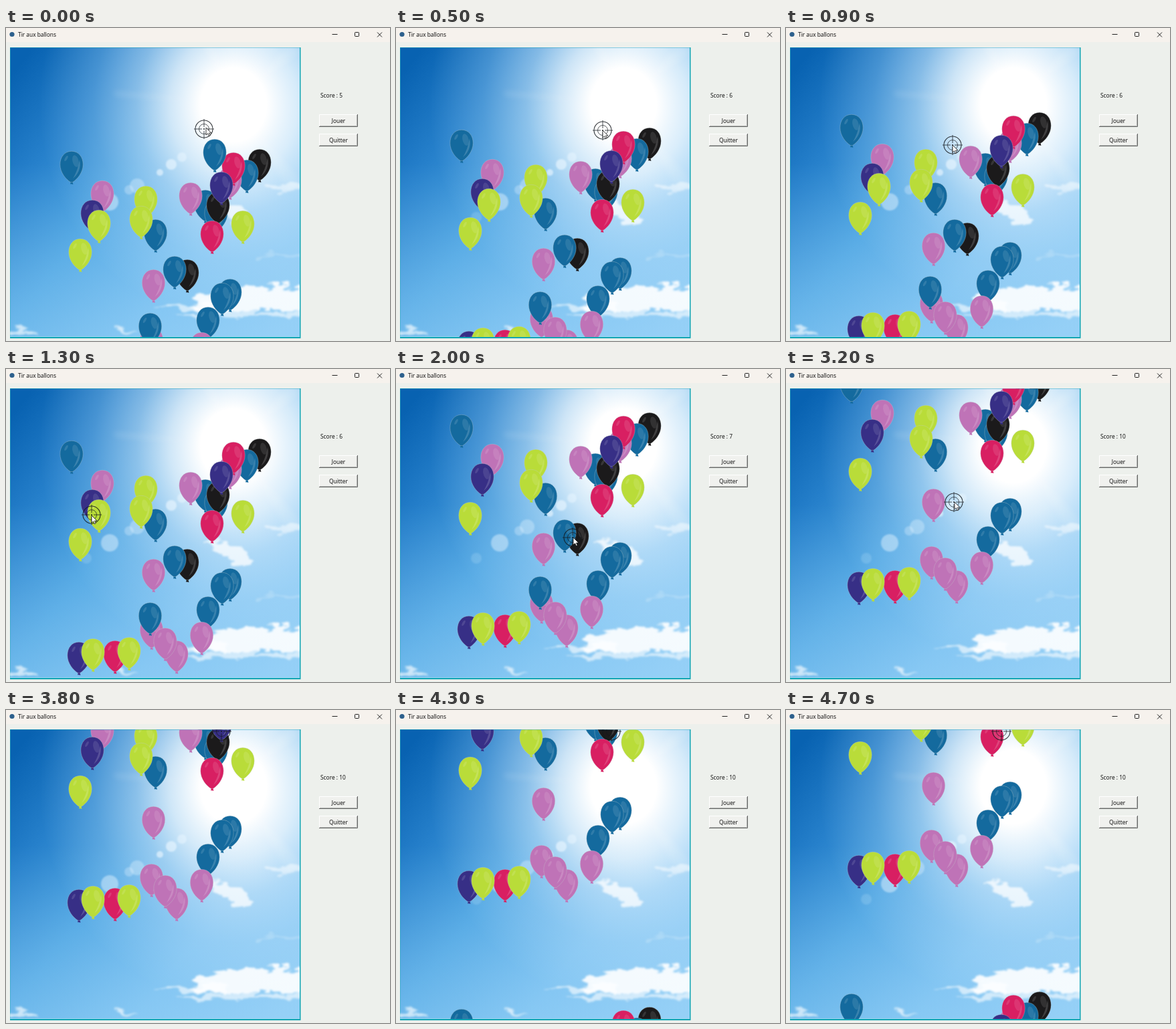
An HTML page that plays this animation: 574 by 468 pixels, repeating every 4800 ms.

```html
<!DOCTYPE html>
<html lang="fr">
<head>
<meta charset="utf-8">
<title>Tir aux ballons</title>
<style>
  html, body { margin: 0; width: 100%; height: 100%; overflow: hidden; background: #edf0ec; }
  svg { display: block; }
  text { font-family: "Open Sans", "Noto Sans", sans-serif; font-size: 8.4px; fill: #050505; }
</style>
</head>
<body>
<svg id="stage" width="574" height="468" viewBox="0 0 574 468">
  <defs>
    <linearGradient id="sky" x1="0" y1=".1" x2="1" y2=".9">
      <stop offset="0" stop-color="#0862b1"/>
      <stop offset=".2" stop-color="#2680cb"/>
      <stop offset=".42" stop-color="#4aa2e1"/>
      <stop offset=".7" stop-color="#76bdef"/>
      <stop offset="1" stop-color="#8ecaf4"/>
    </linearGradient>
    <radialGradient id="glow" gradientUnits="userSpaceOnUse" cx="0" cy="0" r="1"
      gradientTransform="translate(340 115) scale(290 325)">
      <stop offset="0" stop-color="#fff"/>
      <stop offset=".17" stop-color="#fff"/>
      <stop offset=".33" stop-color="#f8fcff" stop-opacity=".77"/>
      <stop offset=".5" stop-color="#e8f5ff" stop-opacity=".46"/>
      <stop offset=".72" stop-color="#d8efff" stop-opacity=".2"/>
      <stop offset="1" stop-color="#d5eeff" stop-opacity="0"/>
    </radialGradient>
    <linearGradient id="haze" x1="0" y1="0" x2="0" y2="1">
      <stop offset=".4" stop-color="#9fd8fa" stop-opacity="0"/>
      <stop offset="1" stop-color="#9fd8fa" stop-opacity=".42"/>
    </linearGradient>
    <filter id="wisp" filterUnits="userSpaceOnUse" x="0" y="220" width="460" height="250"
      color-interpolation-filters="sRGB">
      <feTurbulence type="fractalNoise" baseFrequency=".03 .07" numOctaves="4" seed="6"/>
      <feDisplacementMap in="SourceGraphic" scale="26" xChannelSelector="R" yChannelSelector="G"/>
      <feGaussianBlur stdDeviation="1.6"/>
    </filter>
    <filter id="soft" x="-20%" y="-20%" width="140%" height="140%"><feGaussianBlur stdDeviation="4"/></filter>
    <filter id="lens"><feGaussianBlur stdDeviation="1"/></filter>
    <clipPath id="field"><rect x="6.5" y="29.5" width="432.5" height="432.5"/></clipPath>
    <g id="balloon">
      <path d="M-1.3 45L-1.8 49.6Q0 48.8 2.4 50L1.3 45Z"/>
      <path d="M0 .3C10.5 .3 17.2 8.8 17.2 20C17.2 32 8.5 42.5 1.5 46.5H-1.5C-8.5 42.5-17.2 32-17.2 20C-17.2 8.8-10.5 .3 0 .3Z"
        stroke="#c3cbcc" stroke-opacity=".45" stroke-width=".7"/>
      <path d="M12 13C15 25 9 36 2 41C7 33 10 24 12 13Z" fill="#fff" opacity=".16"/>
      <ellipse cx="6" cy="15" rx="4.5" ry="9" transform="rotate(-14 6 15)" fill="#fff" opacity=".1"/>
      <ellipse cx="-8" cy="11" rx="1.8" ry="4.5" transform="rotate(28 -8 11)" fill="#fff" opacity=".12"/>
    </g>
  </defs>

  <rect width="574" height="468" fill="#edf0ec"/>
  <rect width="574" height="21" fill="#f6f2ed"/>
  <circle cx="9" cy="9.5" r="3.6" fill="#2d608c"/>
  <text x="18" y="12.7">Tir aux ballons</text>
  <g fill="none" stroke="#222">
    <path d="M487.5 9.5h8M555 6.5l7 7m0-7l-7 7"/>
    <rect x="521.5" y="6.5" width="6" height="6" rx=".8"/>
  </g>

  <rect x="6" y="29" width="434.5" height="435" fill="#12a5b4"/>
  <g clip-path="url(#field)">
    <rect x="6" y="29" width="433" height="433" fill="url(#sky)"/>
    <rect x="6" y="29" width="433" height="433" fill="url(#haze)"/>
    <rect x="6" y="29" width="433" height="433" fill="url(#glow)"/>
    <g fill="#fff" opacity=".13" filter="url(#soft)">
      <path d="M340 112L160 94L164 102ZM340 112L292 22H310ZM340 112L425 22L440 36ZM340 112L445 232L425 246Z"/>
    </g>
    <g fill="#e9f6ff" filter="url(#lens)">
      <circle cx="155" cy="260" r="13" opacity=".45"/>
      <circle cx="120" cy="283" r="8" opacity=".16"/>
      <circle cx="184" cy="242" r="7" opacity=".3"/>
      <circle cx="196" cy="236" r="11" opacity=".34"/>
      <circle cx="230" cy="216" r="5" opacity=".65"/>
      <circle cx="247" cy="204" r="8" opacity=".65"/>
      <circle cx="263" cy="193" r="7" opacity=".55"/>
    </g>
    <g fill="#fff" filter="url(#wisp)">
      <path d="M292 400Q330 384 385 385L455 388V426Q400 416 360 420Q310 424 268 417Q282 409 292 400Z" opacity=".9"/>
      <path d="M225 419Q270 413 330 412V418Q270 424 225 419ZM245 432Q300 423 370 420V428Q300 434 245 432ZM310 432Q370 424 445 424V431Q380 435 310 432Z" opacity=".6"/>
      <path d="M300 256Q335 257 353 267Q371 278 366 290Q354 302 342 291Q325 276 300 262Z" opacity=".75"/>
      <path d="M385 237Q420 232 445 236V241Q420 240 385 241Z" opacity=".5"/>
      <path d="M4 451Q22 448 48 457Q22 460 4 457ZM165 449Q182 445 198 451Q182 454 165 452Z" opacity=".65"/>
      <path d="M375 338Q410 332 440 338V342Q405 339 375 343Z" opacity=".2"/>
    </g>
    <path d="M6 461.5H439" stroke="#a9e0ee" opacity=".6"/>
    <g id="balloons"></g>
    <g id="sight" fill="none" stroke="#15191d" opacity=".85">
      <circle r="13" stroke-width="1.1"/>
      <circle r="7.5" stroke-width=".8"/>
      <path d="M-15 0H-3M3 0H15M0-15V-3M0 3V15" stroke-width=".9"/>
      <circle r="1.1" fill="#15191d" stroke="none"/>
    </g>
  </g>

  <text id="score" x="470" y="104"></text>
  <g id="buttons"></g>
  <path id="pointer" d="M0 0V11L2.6 8.7L4.4 12.6L6.2 11.8L4.5 8H8Z" fill="#fff" stroke="#111" stroke-width=".8"/>
</svg>

<script>
// balloons that rise past TOP come back SPAN lower
const LOOP = 4800, STEP = 100, TOP = -8, SPAN = 508;
const COLORS = { b: '#146a9e', p: '#bf73b7', y: '#b9dc39', i: '#372f86', r: '#d81f62', k: '#1b1a1b' };

// x, top at start, colour, time of the hit; back to front
const BALLOONS = [
  [98, 184, 'b'], [144, 228, 'p'], [129, 257, 'i'], [139, 272, 'y', 1500], [111, 315, 'y'],
  [379, 181, 'k'], [360, 197, 'b'], [335, 207, 'p'], [340, 186, 'r'],
  [298, 242, 'b'], [276, 231, 'p'], [314, 257, 'b'], [317, 245, 'k'], [322, 215, 'i'], [308, 288, 'r'],
  [354, 273, 'y'], [209, 236, 'y'], [223.5, 286, 'b'], [202, 266, 'y'],
  [271, 346, 'k', 2400], [252, 341, 'b', 2200], [220.5, 361, 'p'],
  [335, 375, 'b'], [323, 381, 'b'], [302, 417, 'b'], [292.5, 455, 'p'],
  [255, 483, 'p'], [217.5, 447, 'p'], [238, 464, 'p'], [215.5, 426, 'b', 3000],
  [109, 485, 'i'], [163, 483, 'r'], [130, 480, 'y'], [184, 478, 'y'],
  [312, 166, 'b', 400]
];

// time, then values
const RISE = [[0, 0], [500, 32], [1300, 77], [2000, 116], [2600, 146], [3800, 217], [4700, 268]];
const AIM = [[0, 296, 151], [400, 309, 153], [700, 309, 153], [1300, 128, 218], [1500, 129, 218],
  [2000, 264, 252], [2600, 265, 250], [2900, 216, 283], [3100, 216, 283], [3400, 322, 32]];
const POINT = [[0, 299, 149], [400, 309, 153], [700, 309, 153], [1300, 128, 219], [1500, 129, 219],
  [2000, 265, 252], [2600, 266, 251], [2900, 217, 284], [3100, 217, 284], [3400, 322, 28], [3500, 322, -20]];

const byId = id => document.getElementById(id);
function add(parent, tag, attrs, text = '') {
  const el = document.createElementNS('http://www.w3.org/2000/svg', tag);
  for (const key in attrs) el.setAttribute(key, attrs[key]);
  el.textContent = text;
  return parent.appendChild(el);
}
function at(keys, t) {
  const n = keys.findIndex(k => k[0] > t);
  if (n < 0) return keys[keys.length - 1].slice(1);
  const a = keys[n - 1], b = keys[n], f = (t - a[0]) / (b[0] - a[0]);
  return a.slice(1).map((v, i) => Math.round(v + (b[i + 1] - v) * f));
}
const place = (el, x, y) => el.setAttribute('transform', `translate(${x} ${y})`);

function addButton(y, label) {
  const g = add(byId('buttons'), 'g', { transform: `translate(468 ${y})` });
  add(g, 'rect', { width: 58, height: 19, fill: '#f0f1ee' });
  add(g, 'path', { d: 'M.5 18V.5H57', fill: 'none', stroke: '#fff' });
  add(g, 'path', { d: 'M1 17.5H56.5V1', fill: 'none', stroke: '#b0b2b0' });
  add(g, 'path', { d: 'M0 18.5H57.5V0', fill: 'none', stroke: '#676967' });
  add(g, 'text', { x: 29, y: 13, 'text-anchor': 'middle' }, label);
}
addButton(129, 'Jouer');
addButton(158, 'Quitter');

const shapes = BALLOONS.map(b => add(byId('balloons'), 'use', { href: '#balloon', fill: COLORS[b[2]] }));

function draw(now) {
  const t = Math.floor(now % LOOP / STEP) * STEP;
  const [rise] = at(RISE, t);
  let score = 5;
  BALLOONS.forEach(([x, top, , hit], i) => {
    const popped = t >= hit;
    if (popped) score++;
    shapes[i].style.display = popped ? 'none' : '';
    place(shapes[i], x, (top - rise - TOP + SPAN) % SPAN + TOP);
  });
  byId('score').textContent = 'Score : ' + score;
  place(byId('sight'), ...at(AIM, t));
  place(byId('pointer'), ...at(POINT, t));
  requestAnimationFrame(draw);
}
draw(0);
</script>
</body>
</html>
```
